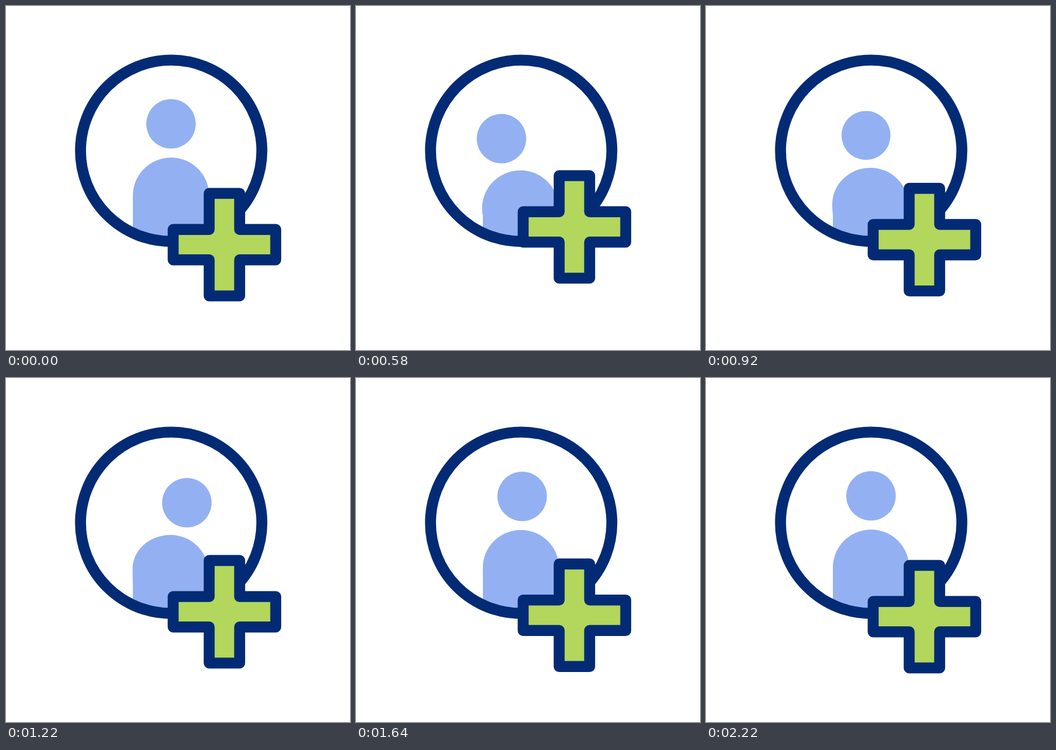
An HTML page that plays this animation: 640 px wide and 640 px high, repeating every 2.4 s.

```html
<!DOCTYPE html>
<html lang="en">
<head>
<meta charset="utf-8">
<title>Add user</title>
<style>
  html, body { margin: 0; width: 100%; height: 100%; overflow: hidden; background: #fff; }
  svg { display: block; width: 100%; height: 100%; }
</style>
</head>
<body>
<svg viewBox="0 0 640 640">
  <clipPath id="disc"><circle cx="307.3" cy="269.3" r="165"/></clipPath>
  <g fill="#93b1f2" clip-path="url(#disc)">
    <path id="body"/>
    <circle id="head"/>
  </g>
  <g stroke="#032b75" stroke-width="20.4" stroke-linejoin="round">
    <circle cx="307.3" cy="269.3" r="168.7" fill="none"/>
    <path id="plus" fill="#b2d75c"
      d="M378 348.6H434.7V415.7H501.8V472.3H434.7V539.4H378V472.3H311V415.7H378Z"/>
  </g>
</svg>
<script>
const LOOP = 2400;
const [head, body, plus] = ['head', 'body', 'plus'].map(id => document.getElementById(id));

// Head: x, y, radius
const HEAD = { rest: [307, 219.3, 46], left: [270.4, 247, 46], right: [336.5, 232, 46] };
// Body: left x, left y, top x, top y, right x, right y
const BODY = {
  rest: [236, 353, 307, 282, 378, 353],
  left: [234.5, 377, 306, 306, 377, 377],
  right: [235.5, 355, 306, 292, 377, 363]
};

const track = (pose, times) =>
  ['rest', 'left', 'left', 'right', 'right', 'rest'].map((name, i) => [times[i], pose[name]]);
const headKeys = track(HEAD, [200, 600, 700, 1200, 1240, 1720]);
const bodyKeys = track(BODY, [200, 600, 720, 1220, 1240, 1720]);
const plusKeys = [
  [200, [0]], [580, [-33]], [1105, [0]], [1345, [-19]],
  [1580, [0]], [1890, [-26]], [2220, [0]]
];

const ease = p => p * p * (3 - 2 * p);

function sample(keys, t) {
  if (t <= keys[0][0]) return keys[0][1];
  for (let i = 1; i < keys.length; i++) {
    const [t0, a] = keys[i - 1], [t1, b] = keys[i];
    if (t < t1) {
      const k = ease((t - t0) / (t1 - t0));
      return a.map((v, j) => v + (b[j] - v) * k);
    }
  }
  return keys[keys.length - 1][1];
}

function bodyPath([lx, ly, tx, ty, rx, ry]) {
  const c = 0.5523;
  return `M236 440V390Q${lx} ${Math.min(384, ly + 8)} ${lx} ${ly}` +
    `C${lx} ${ly - (ly - ty) * c} ${tx - (tx - lx) * c} ${ty} ${tx} ${ty}` +
    `C${tx + (rx - tx) * c} ${ty} ${rx} ${ry - (ry - ty) * c} ${rx} ${ry}V440Z`;
}

function draw(t) {
  const [x, y, r] = sample(headKeys, t);
  // The head shrinks slightly while it swings across
  const swing = t > 700 && t < 1200 ? ease((t - 700) / 500) : 0;
  head.setAttribute('cx', x);
  head.setAttribute('cy', y);
  head.setAttribute('r', r - 2 * swing * (1 - swing));
  body.setAttribute('d', bodyPath(sample(bodyKeys, t)));
  plus.setAttribute('transform', `translate(0 ${sample(plusKeys, t)[0]})`);
}

const start = performance.now();
function tick() {
  draw((performance.now() - start) % LOOP);
  requestAnimationFrame(tick);
}
draw(0);
requestAnimationFrame(tick);
</script>
</body>
</html>
```
